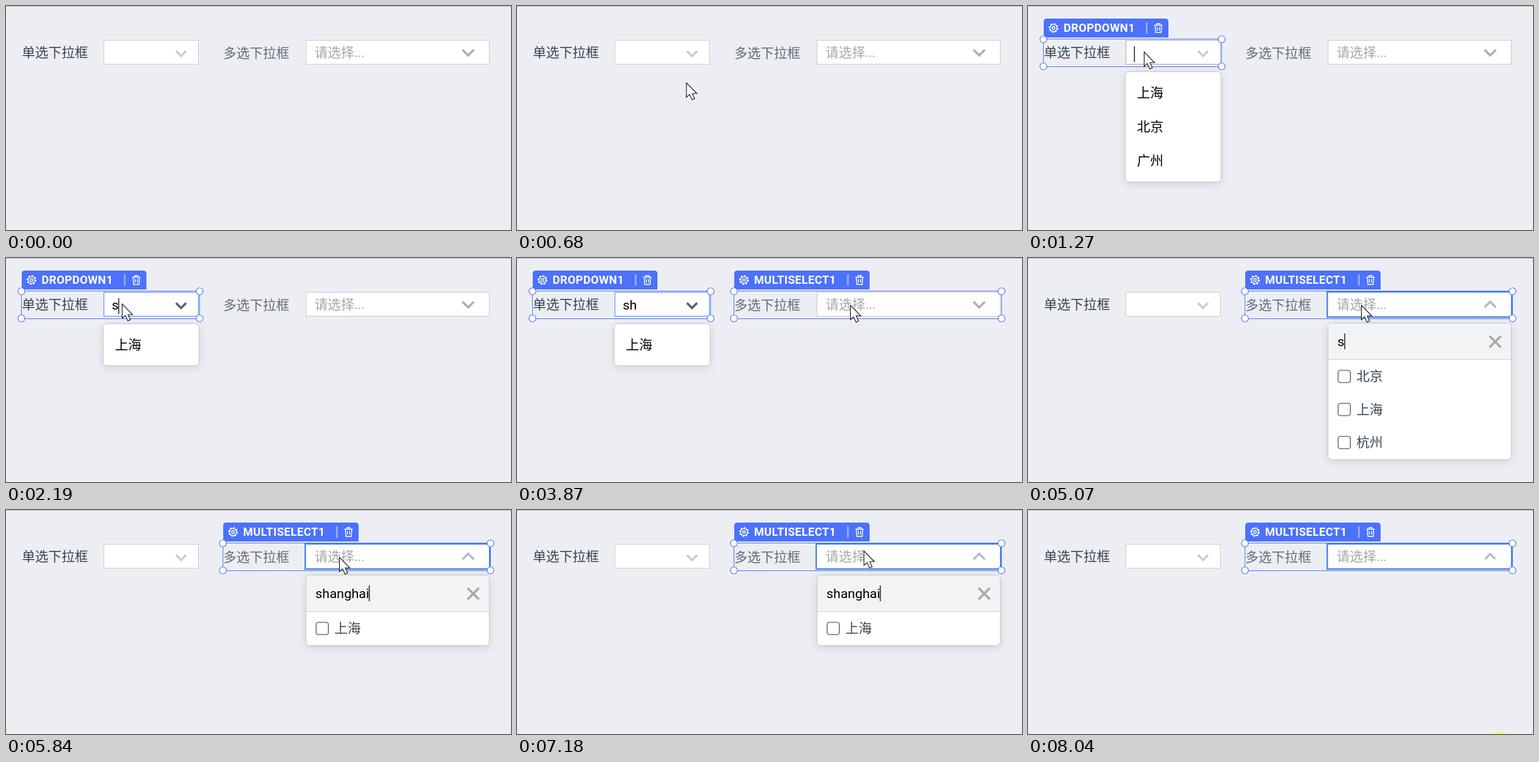
These frames come from a looping animation (802 by 356 pixels, 8110 ms). An HTML page:

```html
<!DOCTYPE html>
<html lang="zh-CN">
<head>
<meta charset="utf-8">
<style>
html, body { margin: 0; width: 100%; height: 100%; overflow: hidden; background: #edeef4; }
svg { display: block; font: 21px Roboto, "Noto Sans CJK SC", "Noto Sans CJK JP", "Noto Sans CJK", sans-serif; }
.pop { filter: drop-shadow(0 3px 7px rgba(0, 0, 0, .12)); }
.line { fill: none; stroke-width: 3.5; }
.tag { font-size: 18px; font-weight: 700; letter-spacing: .35px; fill: #fff; }
.icon { fill: none; stroke: #fff; stroke-width: 1.4; }
</style>
</head>
<body>
<svg id="stage" width="802" height="356" viewBox="0 0 802 356"></svg>
<script>
const LOOP = 8110;
const CITIES = ['上海', '北京', '广州'];
const OPTIONS = ['北京', '上海', '杭州'];
const KEYS_1 = [2190, 2310];
const KEYS_2 = [5070, 5130, 5190, 5250, 5310, 5370, 5530, 5650];
const CARET_RESETS = [1260, 2190, 2240, 4140, 5070, 5370, 5650];
const CLICKS = [[1140, 1260], [4080, 4200], [8040, LOOP]];
// time, x, y of the pointer tip
const PATH = [
  [90, 712, 358], [890, 179, 74], [980, 184.5, 73], [2900, 184.5, 73], [3050, 201, 105],
  [3240, 201, 105], [3870, 529.5, 75], [7110, 529.5, 75], [7180, 551, 65], [7790, 766, 362], [8040, 750, 376]
];

const text = (x, y, s, color, attrs = '') => `<text x="${x}" y="${y}" fill="${color}" ${attrs}>${s}</text>`;
const rect = (x, y, w, h, attrs) => `<rect x="${x}" y="${y}" width="${w}" height="${h}" ${attrs}/>`;

function selection(id, left, right, tagRight, name) {
  const handles = [[left, 53], [right, 53], [left, 96], [right, 96]]
    .map(([x, y]) => `<circle cx="${x}" cy="${y}" r="5.5" fill="#fff" stroke="#4f74f6" stroke-width="1.2"/>`).join('');
  return `<g id="${id}">
    ${rect(left, 52.5, right - left, 44, 'fill="none" stroke="#4f74f6"')}
    <path d="M${left + .5} 50V25q0-5 5-5H${tagRight - 5}q5 0 5 5V50z" fill="#4c71fa"/>
    <g class="icon" transform="translate(${left + 16} 35)">
      <circle r="5.6"/><circle r="2.2"/><circle r="6.8" stroke-width="1.8" stroke-dasharray="2.67"/>
    </g>
    ${text(left + 32, 41, name, '#fff', 'class="tag"')}
    ${rect(tagRight - 36, 26, 3, 18, 'fill="#92a9fc"')}
    <path class="icon" transform="translate(${tagRight - 16} 35)"
      d="M-6.5-4.5H6.5M-2.5-4.5V-7H2.5V-4.5M-5-4.5L-4.3 7H4.3L5-4.5M-1.7-1.5V4M1.7-1.5V4"/>
    ${handles}</g>`;
}

const checkRow = (name, i) => {
  const y = 188 + i * 52.5;
  return `<g id="option${i}">
    ${rect(492.5, y - 9.5, 19.5, 19.5, 'rx="3.5" fill="#fff" stroke="#73777d" stroke-width="1.7"')}
    ${text(521.5, y + 7, name, '#364654')}</g>`;
};

stage.innerHTML = `
  <rect width="802" height="356" fill="#edeef4"/>
  <rect width="802" height="1" fill="#b9bbc2"/>
  ${text(25.3, 81, '单选下拉框', '#33434f')}
  ${text(345, 82, '多选下拉框', '#626c76')}
  ${rect(155.5, 54.5, 150, 38, 'id="box1" fill="#fff"')}
  ${rect(476.5, 54.5, 291, 38, 'id="box2" fill="#fff" stroke="#c8c9cc"')}
  <path id="chevron1" class="line" d="M270 71.5l8 8 8-8"/>
  <path id="chevron2" class="line"/>
  ${text(490, 81, '请选择...', '#a4a6a8')}
  ${text(168, 82, '', '#000', 'id="input1"')}
  ${selection('select1', 24.5, 307.5, 223, 'DROPDOWN1')}
  ${rect(475, 54, 293, 40, 'id="focus2" fill="none" stroke="#4487f5" stroke-width="2"')}
  ${selection('select2', 344.5, 769.5, 560, 'MULTISELECT1')}
  <g id="pop1" class="pop">
    ${rect(154.5, 104.5, 152, 175, 'id="panel1" rx="6" fill="#fff" stroke="#c8c9cf"')}
    ${CITIES.map((c, i) => text(173, 145 + i * 54, c, '#000', `id="city${i}"`)).join('')}
  </g>
  <g id="pop2" class="pop">
    ${rect(476.5, 103.5, 291, 217, 'id="panel2" rx="6" fill="#fff" stroke="#c6c8cc"')}
    <path d="M477 161V109.5q0-5.5 5.5-5.5H761.5q5.5 0 5.5 5.5V161z" fill="#f1f3f5"/>
    <path d="M477 161.5H767" stroke="#cfd1d4"/>
    <path id="clear" class="line" d="M733 124l18 18M751 124l-18 18" stroke="#a8a8a8" stroke-width="3"/>
    ${text(491.5, 140, '', '#000', 'id="input2"')}
    ${OPTIONS.map(checkRow).join('')}
  </g>
  <path id="caret" stroke="#222" stroke-width="1.5"/>
  <circle id="halo" r="24" fill="#fafa50" opacity=".65"/>
  <path id="pointer" d="M0 0V23L5 18.3 9 27 13 25.3 9.2 17H16.5z" fill="#fff" stroke="#111" stroke-width="1.1"/>`;

const $ = id => document.getElementById(id);
const set = (id, name, value) => $(id).setAttribute(name, value);
const show = (id, on) => { $(id).style.display = on ? '' : 'none'; };
const between = (t, a, b) => t >= a && t < b;
const typed = (word, keys, t) => word.slice(0, keys.filter(k => t >= k).length);
const fade = (t, a, b) => Math.max(0, Math.min(1, (t - a) / (b - a)));

function pointerAt(t) {
  const next = PATH.findIndex(p => p[0] > t);
  if (next < 1) return PATH[next ? PATH.length - 1 : 0].slice(1);
  const [t0, x0, y0] = PATH[next - 1], [t1, x1, y1] = PATH[next];
  const u = (t - t0) / (t1 - t0), e = u * u * (3 - 2 * u);
  return [x0 + (x1 - x0) * e, y0 + (y1 - y0) * e];
}

function render(t) {
  const focused1 = between(t, 1330, 4140);
  show('select1', between(t, 760, 4140));
  show('select2', t >= 3600);
  set('box1', 'stroke', focused1 ? '#4589f2' : between(t, 1200, 1330) ? '#a6a8ac' : '#cbccd0');
  set('chevron1', 'stroke', focused1 ? '#5c5f62' : '#cbcccd');

  const found1 = t >= KEYS_1[0];
  show('pop1', between(t, 1200, 4140));
  $('pop1').style.opacity = fade(t, 1160, 1270);
  set('panel1', 'height', found1 ? 66.5 : 175);
  show('city1', !found1);
  show('city2', !found1);
  $('input1').textContent = t < 4140 ? typed('sh', KEYS_1, t) : '';

  const open2 = between(t, 4140, 8040), found2 = t >= 5840;
  show('focus2', t >= 4140);
  set('chevron2', 'd', t < 4140 ? 'M725 69.5l9 9 9-9' : open2 ? 'M725 78.5l9-9 9 9' : 'M726 78l8-8 8 8');
  set('chevron2', 'stroke', t < 4140 ? '#adaeb0' : '#b0bccf');
  show('pop2', open2);
  $('pop2').style.opacity = fade(t, 4080, 4330);
  set('panel2', 'height', found2 ? 112 : 217);
  $('option0').lastChild.textContent = OPTIONS[found2 ? 1 : 0];
  show('option1', !found2);
  show('option2', !found2);
  show('clear', t >= KEYS_2[0]);
  $('input2').textContent = typed('shanghai', KEYS_2, t);

  const reset = CARET_RESETS.filter(r => r <= t).pop();
  show('caret', between(t, 1260, 8040) && (t - reset) % 1060 < 530);
  const input = $(t < 4140 ? 'input1' : 'input2');
  const width = input.textContent ? input.getComputedTextLength() : 0;
  const x = Math.round(+input.getAttribute('x') + width + .5);
  set('caret', 'd', `M${x} ${t < 4140 ? 64 : 120}v25`);

  const place = `translate(${pointerAt(t).join(' ')})`;
  set('pointer', 'transform', place);
  set('halo', 'transform', place);
  show('halo', CLICKS.some(([a, b]) => between(t, a, b)));
}

const start = performance.now();
function tick() {
  render((performance.now() - start) % LOOP);
  requestAnimationFrame(tick);
}
tick();
</script>
</body>
</html>
```
